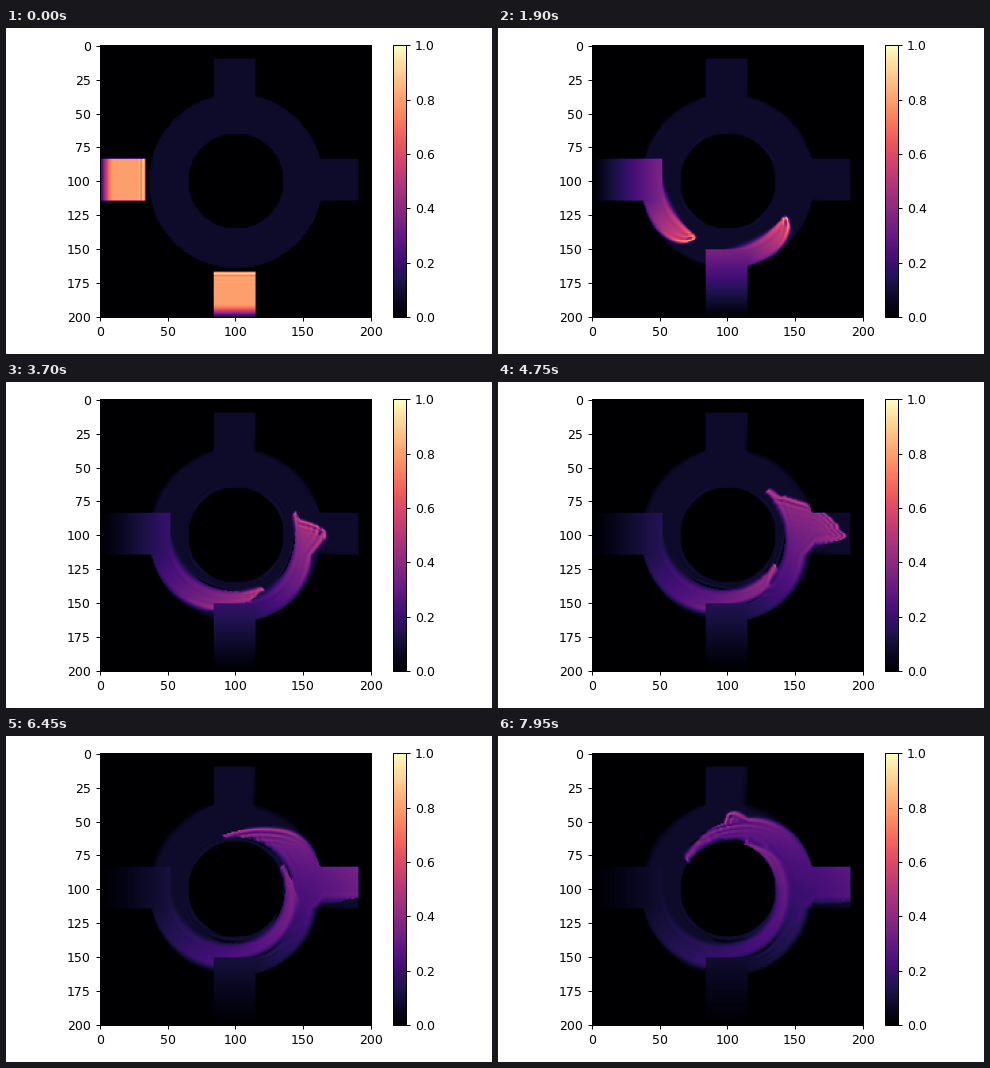
A matplotlib script that plays this animation: 486x326 px, repeating every 8 s.

```python
import numpy as np
import matplotlib.pyplot as plt
from matplotlib.animation import FuncAnimation

W, H, DPI = 486, 326, 90
FRAMES, STEP_MS = 160, 50
N, MID = 201, 100
R_IN, R_OUT = 35, 64.5
SUBSTEPS = 6
DT = 3.5 / SUBSTEPS
WARMUP = 16

# Road layout: 0 off-road, 1 ring, 2 left in, 3 bottom in, 4 right out, 5 top out
Y, X = np.mgrid[:N, :N]
dx, dy = X - MID, Y - MID
r = np.maximum(np.hypot(dx, dy), 1)
rows = (Y >= 84) & (Y <= 114)
cols = (X >= 84) & (X <= 114)

zone = np.zeros((N, N), int)
zone[(r >= R_IN) & (r <= R_OUT)] = 1
zone[rows & (X <= 51)] = 2
zone[cols & (Y >= 151)] = 3
zone[rows & (X >= 150) & (X <= 190)] = 4
zone[cols & (Y <= 50) & (Y >= 10)] = 5
road = zone > 0

# Flow: slight inward spiral on the ring, straight along the arms,
# diagonal where the ring meets an exit
spin = 55 / r
pull = 0.09
u = np.where(zone == 1, spin * (dy - pull * dx) / r, 0)
v = np.where(zone == 1, spin * (-dx - pull * dy) / r, 0)
u[(zone == 2) | (zone == 4)] = 1
v[(zone == 3) | (zone == 5)] = -1
inner = r <= R_OUT
for exit_zone, side in ((4, 1), (5, -1)):
    merge = (zone == exit_zone) & inner
    u[merge] = 0.7 * side
    v[merge] = -0.7


def same_ahead(speed, axis):
    nxt = np.where(speed > 0, np.roll(zone, -1, axis), np.roll(zone, 1, axis))
    return nxt == zone


FLOW = [(u, 1, u > 0, same_ahead(u, 1)), (v, 0, v > 0, same_ahead(v, 0))]


def rate(rho, ahead):
    f = rho * rho / 2
    total = 0
    for speed, axis, positive, inside in FLOW:
        lower = f - np.roll(f, 1, axis)
        upper = np.roll(lower, -1, axis)
        slope = np.where(positive, lower, upper)
        if ahead:
            front = np.where(positive, upper, lower)
            slope = np.where(inside, front, slope)
        total = total - speed * slope
    return total


def advance(rho):
    guess = np.where(road, rho + DT * rate(rho, False), 0)
    new = (rho + guess + DT * rate(guess, True)) / 2
    return np.where(road, np.clip(new, 0, 1), 0)


def simulate():
    rho = np.where(road, 0.08, 0)
    rho[((zone == 2) | (zone == 3)) & ~inner] = 0
    rho[(zone == 2) & (X < 30)] = 0.8
    rho[(zone == 3) & (Y > 170)] = 0.8
    for _ in range(WARMUP):
        rho = advance(rho)
    out = [rho]
    for _ in range(FRAMES - 1):
        for _ in range(SUBSTEPS):
            rho = advance(rho)
        out.append(rho)
    return out


def shown(i):
    """The picture stalls a few times, then catches up."""
    for first, last in ((103, 103), (116, 120), (134, 139)):
        if first <= i <= last:
            return first - 1
    return i


def box(x, y, w, h):
    return [x / W, 1 - (y + h) / H, w / W, h / H]


density = simulate()

fig = plt.figure(figsize=(W / DPI, H / DPI), dpi=DPI, facecolor="white")
plt.rcParams.update({"font.family": "DejaVu Sans", "font.size": 10})
ax = fig.add_axes(box(93.5, 17.4, 271.8, 271.8))
cax = fig.add_axes(box(386.5, 17.4, 13.6, 271.8))
image = ax.imshow(density[0], cmap="magma", vmin=0, vmax=1)
ax.set_xticks(range(0, 201, 50))
ax.set_yticks(range(0, 201, 25))
fig.colorbar(image, cax=cax)


def draw(i):
    image.set_data(density[shown(i)])
    return [image]


anim = FuncAnimation(fig, draw, frames=FRAMES, interval=STEP_MS,
                     repeat=True, repeat_delay=0)
plt.show()
```
